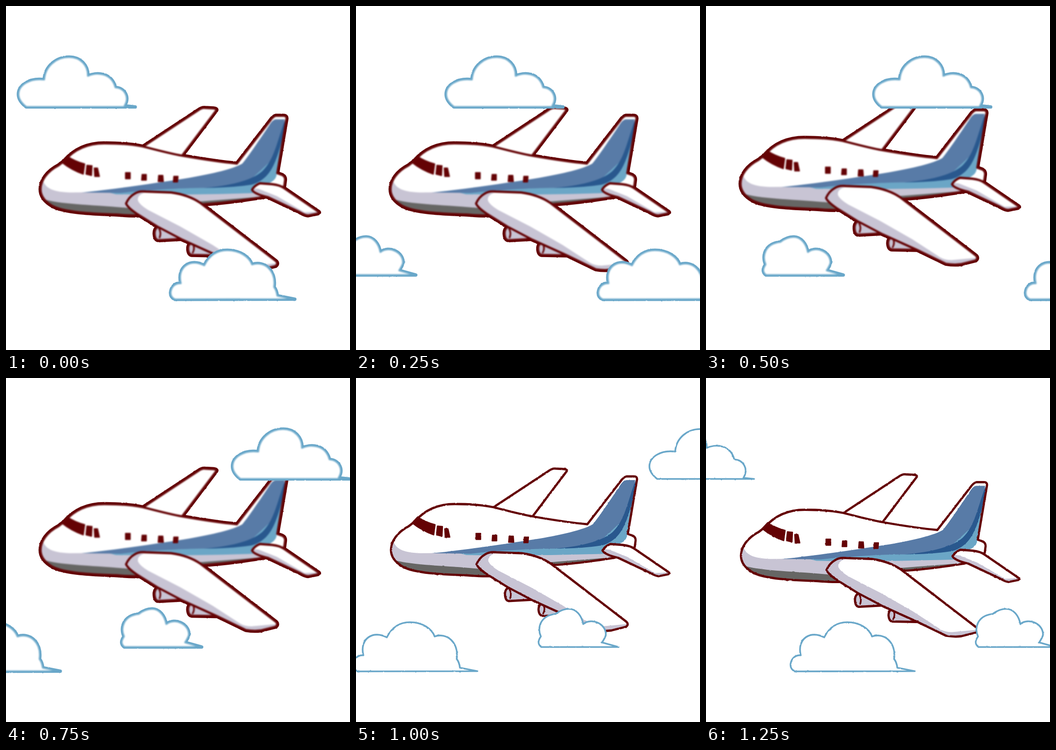
An HTML page for the animation above (1500 ms loop, 748x748 px).

```html
<!DOCTYPE html>
<html lang="en">
<head>
<meta charset="utf-8">
<title>Airplane among clouds</title>
<style>
  html, body { margin: 0; width: 100%; height: 100%; overflow: hidden; background: #fff; }
  svg { display: block; width: 100vw; height: 100vh; }
  path { stroke-linejoin: round; stroke-linecap: round; }
</style>
</head>
<body>
<svg id="sky" viewBox="0 0 748 748">
  <defs>
    <filter id="soft" color-interpolation-filters="sRGB"><feGaussianBlur stdDeviation="1.4"/></filter>
    <filter id="rough" color-interpolation-filters="sRGB">
      <feTurbulence type="fractalNoise" baseFrequency="0.16" numOctaves="2" seed="4"/>
      <feDisplacementMap in="SourceGraphic" scale="2.2" xChannelSelector="R" yChannelSelector="G"/>
    </filter>
  </defs>
</svg>
<script>
const MAROON = '#640204', BLUE = '#587ba7', NAVY = '#29588e', AQUA = '#6ba6c6',
      LILAC = '#c8c4d4', GREY = '#666664', CLOUD = '#69a7c9';

const farWing = 'M299 281 L419 202 Q427 196 434 197 L452 198 Q461 199 458 203 L384 301';
const fuselage = `M128 312 C150 286 180 274 215 274 C250 274 275 276 299 281 C330 289 360 297 384 301
  C430 309 470 315 503 318 L575 225 Q582 215 588 214 L604 214 Q612 214 611 221 L591 339
  L602 343 Q608 346 608 353 L606 368 L562 391 C530 396 480 404 425 407 L293 431
  C270 432 255 430 240 429 C190 427 130 425 103 411 C85 401 76 388 76 374
  C76 355 90 335 115 322 Z`;
const engineA = 'M330 456 Q323 462 324 472 Q325 484 332 485 L387 482 L370 470 Z';
const engineB = 'M404 489 Q396 495 397 505 Q398 516 405 517 L458 518 L440 505 Z';
const nearWing = `M262 405 Q268 391 280 384 Q290 377 305 379 L360 381 Q398 386 424 404
  L588 530 Q594 536 587 541 L555 549 Q540 551 522 548 L460 518 L385 484 L330 455
  L285 427 Q266 414 262 405 Z`;
const tailplane = `M536 375 Q541 366 553 361 L580 363 Q597 365 605 371 L678 421 Q686 425 678 427
  L658 431 Q652 431 640 424 L570 391 Q540 384 536 375 Z`;

const clouds = [
  `M45 219.5 C34 211 28 203 28 192 C28 172 52 156 84 160 C86 130 111 111 138 111
   C164 111 180 130 179 152 C196 144 230 143 239 177 C258 178 271 197 259 217 L282 219.5 Z`,
  `M193 638 C185 634 183 628 184 621 C186 609 195 602 206 603 C197 566 228 548 257 564
   C270 538 290 531 307 531 C334 531 355 545 361 562 C388 553 414 575 409 611
   C413 616 415 622 416 630 L454 637.5 Z`,
  `M403 585 C395 579 395 572 402 562 C394 545 399 517 434 513 C447 503 456 502 463 502
   C480 502 491 518 494 535 C512 520 546 535 543 560 C540 568 538 570 535 575 L571 585 Z`
];

const fill = (d, color) => `<path d="${d}" fill="${color}"/>`;
const stroke = (d, color, width) =>
  `<path d="${d}" fill="none" stroke="${color}" stroke-width="${width}"/>`;

// A filled shape with shading kept inside it and its outline on top.
let clips = 0;
function part(d, base, shade = '') {
  const id = 'clip' + clips++;
  return `<clipPath id="${id}"><path d="${d}"/></clipPath>` + fill(d, base) +
    `<g clip-path="url(#${id})">${shade}</g>` + stroke(d, MAROON, 4.8);
}

const livery =
  fill('M70 335 L81 354 C87 374 108 380 140 381 L262 380 L570 372 L575 440 L70 440 Z', LILAC) +
  fill('M80 395 C120 407 180 407 270 415 L400 402 L430 400 L545 391 L600 385 V440 H80 Z', GREY) +
  fill('M225 381 L420 366 L520 345 L585 290 L608 224 L589 345 Q586 356 570 362 L545 382 Q400 387 240 385 Z', AQUA) +
  fill(`M165 381 C230 375 330 360 400 349 C450 340 495 330 515 318 C530 300 555 262 572 237
    Q580 223 587 222 L607 222 L590 300 L520 365 L435 371 C380 371 300 376 250 382 Z`, BLUE) +
  fill(`M432 371 C490 366 535 355 558 335 C585 309 590 270 608 222 C606 250 597 288 587 312
    C576 340 560 357 535 364 Q490 371 432 371 Z`, NAVY);

const glass = [
  'M134 302 Q150 313 172 319 L169 341 Q143 332 122 315 Z',
  'M177 322 L188 323 L187 344 L175 341 Z',
  'M193 328 L200 328 L204 346 L194 346 Z',
  'M261 338 H271 V351 H261 Z', 'M297 342 H306 V354 H296 Z',
  'M333 344 H342 L343 357 H332 Z', 'M366 346 H375 L374 358 H365 Z'
].map(d => `<path d="${d}" fill="${MAROON}" stroke="${MAROON}" stroke-width="2.4"/>`).join('');

const plane =
  part(farWing, '#fff') +
  part(fuselage, '#fff', livery) + glass +
  part(engineA, LILAC) + stroke('M334 460 Q339 469 335 479', MAROON, 3.6) +
  part(engineB, LILAC) + stroke('M408 494 Q412 503 407 512', MAROON, 3.6) +
  part(nearWing, '#fff',
    fill(`M308 380 Q285 385 288 399 Q292 408 310 419 L380 455 L450 495 L510 534 Q520 540 535 540
      L590 535 V560 H250 V370 Z`, LILAC)) +
  part(tailplane, '#fff', fill('M530 372 L550 373 L590 389 L650 424 L684 423 V440 H530 Z', LILAC));

const planeParts = [farWing, fuselage, engineA, engineB, nearWing, tailplane];

// Each sprite has a hard outer rim, used only in soft steps, beneath its artwork.
function sprite(parts, art, color, width) {
  const g = document.createElementNS('http://www.w3.org/2000/svg', 'g');
  g.innerHTML = `<g filter="url(#rough)">${parts.map(d => stroke(d, color, width)).join('')}</g><g>${art}</g>`;
  document.getElementById('sky').append(g);
  const [rim, body] = g.children;
  return (x, y, soft) => {
    g.setAttribute('transform', `translate(${x - soft} ${y})`);
    rim.setAttribute('display', soft ? 'inline' : 'none');
    body.setAttribute('filter', soft ? 'url(#soft)' : 'url(#rough)');
  };
}

const movePlane = sprite(planeParts, plane, MAROON, 8.4);
const moveClouds = clouds.map(d =>
  sprite([d], fill(d, '#fff') + stroke(d, CLOUD, 3.7), CLOUD, 7.2));

// plane height, then the x shift of each cloud, then softness
const steps = [
  [24.5, 0, 175, -608, 1],
  [24.5, 169, 344, -440, 1],
  [12.5, 338, 512, -271.5, 1],
  [0, 465.5, -335, -144.5, 1],
  [0, 610, -190, 0, 0],
  [12.5, -177.5, 0, 189.5, 0]
];
const HOLD = 250;
const start = performance.now();
let shown = -1;

function draw() {
  const i = Math.floor((performance.now() - start) / HOLD) % steps.length;
  if (i !== shown) {
    const [y, ...rest] = steps[i], soft = rest.pop();
    movePlane(0, y, soft);
    moveClouds.forEach((move, n) => move(rest[n], 0, soft));
    shown = i;
  }
  requestAnimationFrame(draw);
}
draw();
</script>
</body>
</html>
```
